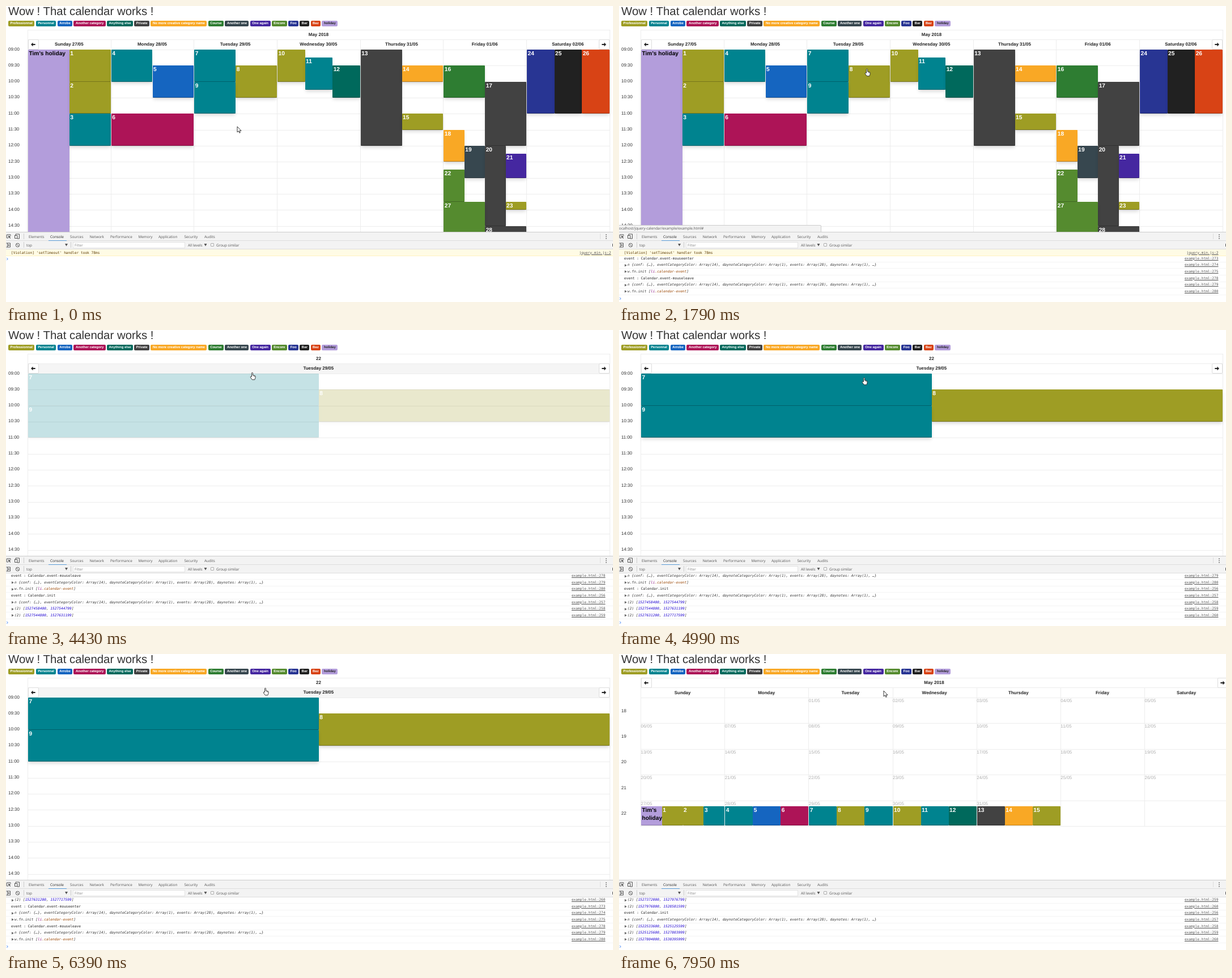
These frames come from a looping animation (1071x523 px, 8 s). An HTML page:

```html
<!DOCTYPE html>
<html lang="en">
<head>
<meta charset="utf-8">
<title>Calendar demo</title>
<style>
html, body { margin: 0; width: 100%; height: 100%; overflow: hidden; background: #fff; }
body { position: relative; font: 7.95px/12px "Liberation Sans", Arial, sans-serif; color: #333; text-rendering: geometricPrecision; }
div, svg { position: absolute; box-sizing: border-box; white-space: pre; }
svg { overflow: visible; }
.layer { inset: 0; }
#page { left: 0; top: 0; width: 1071px; height: 399px; overflow: hidden; }
#badges { left: 4px; top: 26px; display: flex; gap: 2.25px; }
#badges span { padding: 0 3.5px; height: 10px; border-radius: 2px; color: #fff;
  font: bold 5.96px/10px "Liberation Sans", Arial, sans-serif; }
.center { width: 200px; text-align: center; font-weight: bold; color: #222; }
.event { padding: 1px 0 0 1.5px; font-weight: bold; font-size: 10.2px; line-height: 14px; color: #fff; white-space: normal;
  border-bottom: 1px solid rgba(0,0,0,.25); border-radius: 1px; box-shadow: 0 4px 6px -1px rgba(0,0,0,.15); }
#month .event { box-shadow: none; }
.ui { font-family: "Open Sans", "Noto Sans", sans-serif; font-size: 6.4px; color: #555; }
#console { font-family: "DejaVu Sans Mono", monospace; font-size: 6.2px; color: #222; }
#console u { color: #555; }
#console i { color: #333; }
#console b { font-weight: normal; color: #881280; }
#console em { color: #994500; }
#console s { color: #1c00cf; text-decoration: none; }
</style>
</head>
<body>
<div id="page">
  <div class="layer" id="highlight"></div>
  <div class="layer" id="header"></div>
  <div id="badges"></div>
  <div class="layer" id="week"></div>
  <div class="layer" id="day"></div>
  <div class="layer" id="month"></div>
  <div class="layer" id="expanded"></div>
  <div class="layer ui" id="status"></div>
</div>
<div class="layer ui" id="devtools"></div>
<div class="layer" id="console"></div>
<svg id="arrow" width="8" height="12"><path d="M0 0V10L2.3 7.9 3.9 11.3 5.4 10.6 3.9 7.4H7Z" fill="#fff" stroke="#222" stroke-width=".9"/></svg>
<svg id="hand" width="10" height="14"><path d="M2.5 7.6V1.3a1 1 0 0 1 2 0V5Q7.5 5 9 6.4V9.4L7.8 12.8H3.4L.4 8.8Q0 7 1.3 7Z" fill="#fff" stroke="#222" stroke-width=".9"/><path d="M6 5.6V7.4M7.5 6V7.6" stroke="#444" stroke-width=".6"/></svg>
<script>
const LOOP = 8000, LEFT = 38, TOP = 77, ROW = 28.33, WIDTH = 1026.7, LINE = '#ededed';
const $ = id => document.getElementById(id);

const categories = {
  'Professionnal': '#9e9d24', 'Personnal': '#00838f', 'Arrobe': '#1565c0', 'Another category': '#ad1457',
  'Anything else': '#00695c', 'Private': '#424242', 'No more creative category name': '#f9a825',
  'Course': '#2e7d32', 'Another one': '#37474f', 'One again': '#4527a0', 'Encore': '#558b2f',
  'Foo': '#283593', 'Bar': '#212121', 'Baz': '#d84315', 'holiday': '#b39ddb'
};
const [PRO, PERS, ARR, CAT, ANY, PRIV, MORE, COURSE, OTHER, AGAIN, ENC, FOO, BAR, BAZ, HOLIDAY] = Object.values(categories);

// Per day: [colour, lane, lanes, first half-hour, last half-hour]
let number = 0;
const events = [
  [0, [HOLIDAY, 0, 2, 0, 20], [PRO, 1, 2, 0, 2], [PRO, 1, 2, 2, 4], [PERS, 1, 2, 4, 6]],
  [1, [PERS, 0, 2, 0, 2], [ARR, 1, 2, 1, 3], [CAT, 0, 1, 4, 6]],
  [2, [PERS, 0, 2, 0, 2], [PRO, 1, 2, 1, 3], [PERS, 0, 2, 2, 4]],
  [3, [PRO, 0, 3, 0, 2], [PERS, 1, 3, .5, 2.5], [ANY, 2, 3, 1, 3]],
  [4, [PRIV, 0, 2, 0, 6], [MORE, 1, 2, 1, 2], [PRO, 1, 2, 4, 5]],
  [5, [COURSE, 0, 2, 1, 3], [PRIV, 1, 2, 2, 6], [MORE, 0, 4, 5, 7], [OTHER, 1, 4, 6, 8],
      [PRIV, 2, 4, 6, 11], [AGAIN, 3, 4, 6.5, 8], [ENC, 0, 4, 7.5, 9.5], [PRO, 3, 4, 9.5, 10]],
  [6, [FOO, 0, 3, 0, 4], [BAR, 1, 3, 0, 4], [BAZ, 2, 3, 0, 4]],
  [5, [ENC, 0, 2, 9.5, 14], [PRIV, 1, 2, 11, 14]]
].flatMap(([day, ...list]) => list.map(([color, lane, lanes, start, end]) =>
  ({ day, color, lane, lanes, start, end, title: color === HOLIDAY ? "Tim's holiday" : ++number })));

const box = (x, y, w, h, style = '', html = '', cls = '') =>
  `<div class="${cls}" style="left:${x}px;top:${y}px;width:${w}px;height:${h}px;${style}">${html}</div>`;
const text = (x, y, html, style = '') => `<div style="left:${x}px;top:${y - 6}px;${style}">${html}</div>`;
const centered = (x, y, html) => `<div class="center" style="left:${x - 100}px;top:${y - 6}px">${html}</div>`;
const hline = (y, x = LEFT, w = WIDTH, color = LINE) => box(x, y, w, 1, `background:${color}`);
const vline = (x, y, h, color = LINE) => box(x, y, 1, h, `background:${color}`);
const range = (n, f) => Array.from({ length: n }, (_, i) => f(i)).join('');
const two = n => String(n).padStart(2, '0');
const clock = half => `${two(9 + Math.floor(half / 2))}:${half % 2 ? '30' : '00'}`;
const eventBox = (e, x, y, w, h) =>
  box(x, y, w, h, `background:${e.color};${e.color === HOLIDAY ? 'color:#000' : ''}`, e.title, 'event');
const navButton = (x, y, dir) => box(x, y, 19, 18, 'background:#fff;border:1px solid #ddd;border-radius:2px') +
  `<svg style="left:${x + 9.5}px;top:${y + 9}px" width="1" height="1"><path transform="scale(${dir} 1)" d="M4 0 .4-3.5V-1.1H-3.7V1.1H.4V3.5Z" fill="#222"/></svg>`;

function agenda(title, labels, list) {
  const w = WIDTH / labels.length;
  return hline(42) + hline(59) + range(12, i => hline(TOP + ROW * i) + text(4, TOP - .5 + ROW * i, clock(i))) +
    vline(LEFT, 42, 360) + vline(LEFT + WIDTH, 42, 360) +
    labels.map((label, i) => vline(LEFT + w * i, 59, 340) + centered(LEFT + w * (i + .5), 68, label)).join('') +
    centered(551.5, 51, title) + navButton(38.5, 59, -1) + navButton(1045.5, 59, 1) +
    `<div class="layer events">${list.map(e => eventBox(e,
      LEFT + w * (e.day % labels.length) + 1 + (w - 1) * e.lane / e.lanes, TOP + ROW * e.start,
      (w - 1) / e.lanes, ROW * (e.end - e.start))).join('')}</div>`;
}

function monthView() {
  const w = 148.17, h = 45.4;
  const cell = i => {
    const date = i - 1;
    return date < 1 || date > 31 ? '' :
      text(LEFT + .5 + w * (i % 7), 83 + h * Math.floor(i / 7), `${two(date)}/05`, 'color:#b0b0b0');
  };
  const lastWeek = events.filter(e => e.day < 5).map(e => {
    const day = events.filter(o => o.day === e.day), slot = (w - 1) / day.length;
    return eventBox(e, LEFT + w * e.day + 1 + slot * day.indexOf(e), 269, slot, 34);
  }).join('');
  return hline(42, LEFT, 1040) + hline(59, LEFT, 1040) +
    range(6, i => hline(TOP + h * i, LEFT, 1040)) + range(5, i => text(4, 100.5 + h * i, 18 + i)) +
    ['Sunday', 'Monday', 'Tuesday', 'Wednesday', 'Thursday', 'Friday', 'Saturday'].map((name, i) =>
      vline(LEFT + w * i, i ? 59 : 42, i ? 245 : 262) + centered(LEFT + w * (i + .5), 69, name)).join('') +
    centered(556, 51, 'May 2018') + navButton(38.5, 42, -1) + navButton(1055.5, 42, 1) +
    range(35, cell) + `<div class="layer events">${lastWeek}</div>`;
}

function devtools() {
  const tabs = { Elements: 40, Console: 78, Sources: 113, Network: 147.5, Performance: 184, Memory: 233.5,
    Application: 269, Security: 314.5, Audits: 350 };
  return box(0, 399, 1071, 124, 'background:#fff') + box(0, 399, 1071, 31, 'background:#f3f3f3') +
    hline(399, 0, 1071, '#ccc') + hline(414, 0, 1071, '#ddd') + hline(429, 0, 1071, '#ddd') +
    hline(413.5, 75, 32, '#5a9bd5') + vline(31, 402, 10, '#ccc') + vline(31, 417, 10, '#ccc') + vline(114, 417, 10, '#ccc') +
    vline(1048, 402, 10, '#ddd') +
    Object.entries(tabs).map(([name, x]) => text(x, 407.5, name, name === 'Console' ? 'color:#222' : '')).join('') +
    box(118, 417, 198, 11, 'background:#fff;border:1px solid #e2e2e2') +
    text(36, 422.5, 'top') + text(121, 422.5, 'Filter', 'color:#888') + text(321, 422.5, 'All levels') +
    text(371, 422.5, 'Group similar') + box(361, 419, 6, 6, 'background:#fff;border:1px solid #aaa;border-radius:1px') +
    `<svg width="1" height="1" style="left:0;top:0" fill="none" stroke="#555">
      <path d="M4 410H1.5V404H8V406M15.5 405V410.5H20M17 405V403H23.5V411H20V405.5H15.5M.5 419H7.5V426H.5M2.5 419V426"/>
      <circle cx="20.5" cy="422.5" r="3.2"/><path d="M18.3 420.3 22.7 424.7"/>
      <path fill="#555" stroke="none" d="M4 405.5 8.5 407.5 6.6 408.3 8.2 410.5 7.3 411 5.8 408.9 4.5 410ZM4 420.5 6.5 422.5 4 424.5ZM104 420H109L106.5 424.5ZM349.5 420H354.5L352 424.5Z"/>
      <path d="M1059 403.5V411.5" stroke-width="1.5" stroke-dasharray="1.5 1.7"/><path d="M1070.5 420V425"/>
    </svg>`;
}

// Console output
const OBJECT = '<i>n {conf: {…}, eventCategoryColor: Array(14), daynoteCategoryColor: Array(1), events: Array(28), daynotes: Array(1), …}</i>';
const ITEM = '<i>w.fn.init [<b>li</b><em>.calendar-event</em>]</i>';
const span = (from, to) => `<i>(2) [<s>${from}</s>, <s>${to}</s>]</i>`;
const log = (time, event, line, ...details) => [`event : Calendar.${event}`, OBJECT, ...details]
  .map((html, i) => ({ time, html, source: `example.html:${line + i}` }));
const enter = time => log(time, 'event-mouseenter', 273, ITEM);
const leave = time => log(time, 'event-mouseleave', 278, ITEM);
const logs = [
  { time: 0, html: "[Violation] 'setTimeout' handler took 78ms", source: 'jquery.min.js:2', warning: true },
  ...enter(720), ...leave(1717), ...enter(2190), ...leave(2798),
  ...log(4430, 'init', 256, span(1527458400, 1527544799), span(1527544800, 1527631199)),
  { time: 4520, html: span(1527631200, 1527717599), source: 'example.html:260' },
  ...enter(5390), ...leave(6084),
  ...log(6940, 'init', 256, span(1526767200, 1527371999), span(1527372000, 1527976799), span(1527976800, 1528581599)),
  ...log(7640, 'init', 256, span(1522533600, 1525125599), span(1525125600, 1527803999), span(1527804000, 1530395999))
];

function consoleRows(t) {
  const rows = logs.filter(row => row.time <= t).slice(-7), right = rows.length < 7 ? 1067.5 : 1057.5;
  const rowY = i => 435 + 11.65 * i;
  return rows.map(({ html, source, warning }, i) => {
    const y = rowY(i) + (warning ? 1.5 : 0), nested = html.startsWith('<i>');
    return (warning ? box(0, 430, 1071, 12, 'background:#fffbe5;border-bottom:1px solid #fff3c0') : hline(y + 5, 0, 1071, '#f4f4f4')) +
      (nested ? `<svg style="left:10px;top:${y - 2.5}px" width="4" height="5"><path d="M0 0 3.8 2.3 0 4.6Z" fill="#666"/></svg>` : '') +
      text(nested ? 15 : 9, y, html, warning ? 'color:#5c3c00' : '') +
      text(right - 200, y, `<u>${source}</u>`, 'width:200px;text-align:right');
  }).join('') +
    `<svg style="left:1px;top:${rowY(rows.length) - 2}px" width="3" height="4"><path d="M.3 0 2.3 2 .3 4" fill="none" stroke="#4285f4"/></svg>`;
}

// Timeline
const moves = [ // start, end, steps, x, y
  [70, 310, 4, 381.5, 172], [1500, 1790, 5, 437.5, 111], [2720, 3270, 8, 434.5, 75],
  [4900, 5140, 4, 429.5, 93], [5930, 6470, 8, 466.5, 49], [7640, 7950, 5, 467, 64.5]
];
const arrowTimes = [[0, 230], [2798, 3270], [7640, LOOP]];
const statusTimes = [[490, 2798], [5060, 6084]];
const expandTimes = [[720, 1717, 9], [2190, 2798, 8], [5390, 6084, 7]];
const views = [[0, 'week'], [4430, 'day'], [6940, 'week'], [7640, 'month']];
const during = (list, t) => list.find(([from, to]) => t >= from && t < to);

function cursorAt(t) {
  return moves.reduce(([x, y], [start, end, steps, toX, toY]) => {
    const done = t < start ? 0 : Math.min(1, (Math.floor((t - start) / ((end - start) / (steps - 1)) + 1e-6) + 1) / steps);
    return [x + (toX - x) * done, y + (toY - y) * done];
  }, [407.5, 213]);
}

function fade(age) {
  const progress = Math.min(1, (Math.round(age / 80) * 80 + 126) / 400);
  return .5 - .5 * Math.cos(Math.PI * progress);
}

function expandedEvent(title, view) {
  const e = events.find(e => e.title === title), y = TOP + ROW * e.start;
  const w = view === 'week' ? WIDTH / 7 : WIDTH, x = LEFT + (view === 'week' ? w * e.day : 0) + 1;
  return eventBox(e, x, y, w - 1, 420 - y) + '<div style="color:#fff">' +
    text(x + 1, y + 19.5, `${clock(e.start)} - ${clock(e.end)}`, 'font-weight:bold;opacity:.8') +
    text(x + 1, y + 42.5, 'Hello World!') + text(x + 1, y + 54, 'Foo Bar') + '</div>';
}

function highlight(x, y, view) {
  if (view === 'month' || y >= TOP) return '';
  const grey = 'background:#f5f5f5';
  if (y < 59) return box(LEFT, 42, WIDTH, 17, grey);
  const w = view === 'week' ? WIDTH / 7 : WIDTH;
  return box(LEFT + w * Math.floor((x - LEFT) / w), 59, w, 18, grey);
}

const shown = {};
function setHTML(id, html) {
  if (shown[id] !== html) $(id).innerHTML = shown[id] = html;
}

function render(t) {
  const [since, view] = views.filter(([time]) => time <= t).pop();
  for (const id of ['week', 'day', 'month']) $(id).style.display = id === view ? 'block' : 'none';
  $(view).querySelector('.events').style.opacity = since ? fade(t - since) : 1;

  const [x, y] = cursorAt(t), arrow = during(arrowTimes, t), open = during(expandTimes, t);
  setHTML('highlight', highlight(x, y, view));
  setHTML('expanded', open ? expandedEvent(open[2], view) : '');
  setHTML('console', consoleRows(t));
  $('status').style.display = during(statusTimes, t) ? 'block' : 'none';
  $('arrow').style.display = arrow ? 'block' : 'none';
  $('hand').style.display = arrow ? 'none' : 'block';
  const pointer = $(arrow ? 'arrow' : 'hand').style;
  pointer.left = `${x - (arrow ? 0 : 3.4)}px`;
  pointer.top = `${y}px`;
}

$('header').innerHTML = text(4, 10, 'Wow ! That calendar works !', 'font-size:20.4px');
$('badges').innerHTML = Object.entries(categories).map(([name, color]) =>
  `<span style="background:${color};${name === 'holiday' ? 'color:#222' : ''}">${name}</span>`).join('');
$('week').innerHTML = agenda('May 2018', ['Sunday 27/05', 'Monday 28/05', 'Tuesday 29/05', 'Wednesday 30/05',
  'Thursday 31/05', 'Friday 01/06', 'Saturday 02/06'], events);
$('day').innerHTML = agenda('22', ['Tuesday 29/05'], events.filter(e => e.day === 2));
$('month').innerHTML = monthView();
$('status').innerHTML = box(-2, 387, 359, 14, 'background:#f3f3f3;border:1px solid #ccc;border-radius:0 2px 0 0') +
  text(-1.6, 393, 'localhost/jquery-calendar/example/example.html#');
$('devtools').innerHTML = devtools();

const begin = performance.now();
function tick() {
  render((performance.now() - begin) % LOOP);
  requestAnimationFrame(tick);
}
tick();
</script>
</body>
</html>
```
